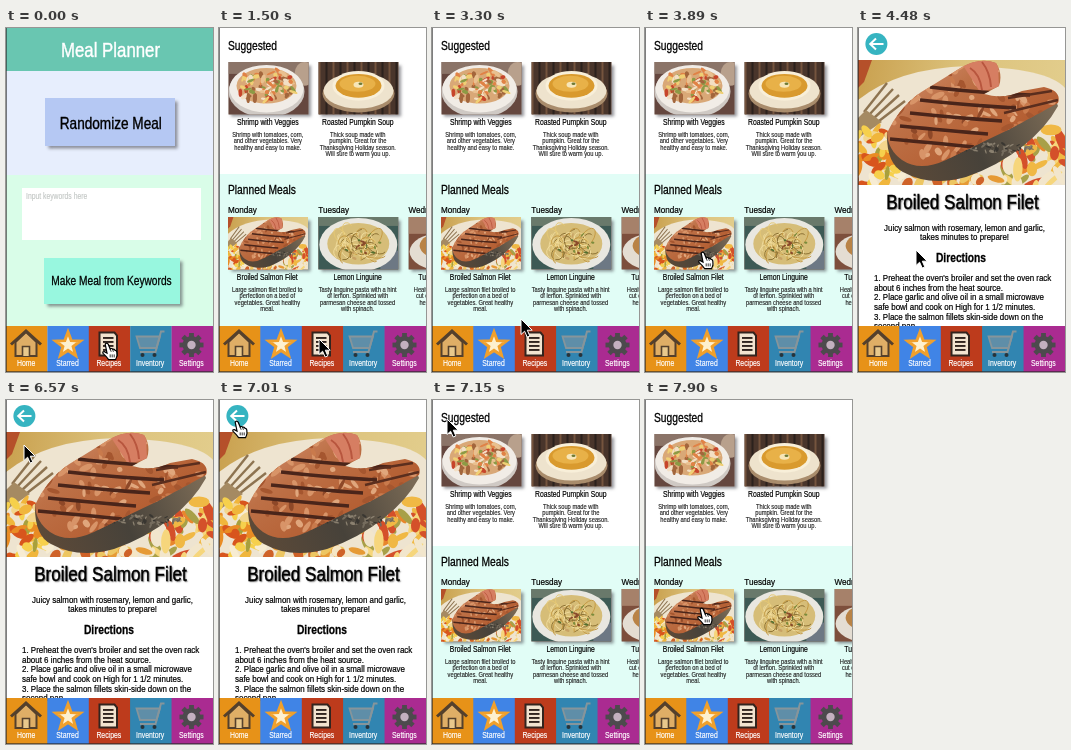
An HTML page with a canvas for the animation above (8000 ms loop, 207 by 344 pixels).

```html
<!DOCTYPE html>
<html lang="en">
<head>
<meta charset="utf-8">
<title>Meal Planner</title>
<style>
  html, body { margin: 0; width: 100%; height: 100%; overflow: hidden; background: #fff; }
  canvas { display: block; width: 207px; height: 344px; }
</style>
</head>
<body>
<canvas id="stage"></canvas>
<script>
const W = 207, H = 344, LOOP = 8000;
const NARROW = 0.82; // condensed face
const canvas = document.getElementById('stage');
const ctx = canvas.getContext('2d');
const dpr = window.devicePixelRatio || 1;
canvas.width = W * dpr;
canvas.height = H * dpr;

// start ms, screen, pointer, x, y
const STEPS = [
  [0, home, hand, 96, 314],
  [1500, list, arrow, 100, 311],
  [3300, list, arrow, 89, 291],
  [3450, list, arrow, 75, 263],
  [3590, list, arrow, 60, 237],
  [3740, list, hand, 54, 224],
  [3890, list, hand, 53, 223],
  [4480, recipe, arrow, 58, 222],
  [5980, recipe, arrow, 48, 167],
  [6130, recipe, arrow, 37, 116],
  [6420, recipe, arrow, 31, 79],
  [6570, recipe, arrow, 18, 45],
  [6720, recipe, arrow, 16, 27],
  [6860, recipe, hand, 13, 21],
  [7010, recipe, hand, 13, 20],
  [7150, list, arrow, 15, 19],
  [7600, list, arrow, 15, 27],
  [7750, list, arrow, 33, 130],
  [7900, list, hand, 52, 207]
];

function rect(x, y, w, h, color) {
  ctx.fillStyle = color;
  ctx.fillRect(x, y, w, h);
}

function ellipse(x, y, rx, ry, color, turn = 0) {
  ctx.beginPath();
  ctx.ellipse(x, y, rx, ry, turn, 0, Math.PI * 2);
  ctx.fillStyle = color;
  ctx.fill();
}

function shape(d, fill, line, width = 1) {
  const path = new Path2D(d);
  if (fill) { ctx.fillStyle = fill; ctx.fill(path); }
  if (line) { ctx.strokeStyle = line; ctx.lineWidth = width; ctx.stroke(path); }
}

function text(str, x, y, size, { align = 'left', color = '#000', weight = 400 } = {}) {
  ctx.save();
  ctx.translate(x, y);
  ctx.scale(NARROW, 1);
  ctx.font = `${weight} ${size}px "Liberation Sans", sans-serif`;
  ctx.textAlign = align;
  ctx.fillStyle = ctx.strokeStyle = color;
  ctx.fillText(str, 0, 0);
  // A hairline gives the strokes a slightly firmer weight
  ctx.shadowColor = 'transparent';
  ctx.lineWidth = size * 0.022;
  ctx.strokeText(str, 0, 0);
  ctx.restore();
}

function lines(rows, x, y, step, size, style) {
  rows.forEach((row, i) => text(row, x, y + i * step, size, style));
}

function shadow(blur, dx, dy, color) {
  ctx.shadowBlur = blur * dpr;
  ctx.shadowOffsetX = dx * dpr;
  ctx.shadowOffsetY = dy * dpr;
  ctx.shadowColor = color;
}

function raised(x, y, w, h, color) {
  ctx.save();
  shadow(3, 2.5, 2.5, 'rgba(60,60,70,.55)');
  rect(x, y, w, h, color);
  ctx.restore();
}

function random(seed) {
  return () => (seed = (seed * 16807) % 2147483647) / 2147483647;
}

// Scatter small food pieces inside an ellipse
function scatter(seed, count, colors, x, y, rx, ry, size) {
  const rnd = random(seed);
  for (let i = 0; i < count; i++) {
    const a = rnd() * Math.PI * 2, r = Math.sqrt(rnd());
    ellipse(x + Math.cos(a) * r * rx, y + Math.sin(a) * r * ry,
      size * (0.6 + rnd()), size * (0.3 + rnd() * 0.4),
      colors[Math.floor(rnd() * colors.length)], rnd() * 3);
  }
}

function photo(x, y, w, h, draw, unitW = w, unitH = h) {
  ctx.save();
  ctx.translate(x, y);
  ctx.beginPath();
  ctx.rect(0, 0, w, h);
  ctx.clip();
  ctx.scale(w / unitW, h / unitH);
  draw();
  ctx.restore();
}

function shrimp() {
  rect(0, 0, 80, 53, '#65473f');
  rect(0, 0, 80, 12, '#8b7468');
  ellipse(76, 12, 10, 12, '#b8a08c');
  ellipse(38, 30, 38, 26, '#cfc9c4');
  ellipse(38, 27, 37, 24, '#f1ece6');
  ellipse(38, 24, 30, 18, '#d9a877');
  scatter(31, 95, ['#e9c08f', '#f3dfc4', '#c7452b', '#e08246', '#8c9a45', '#f0cf74', '#a3663c'],
    38, 24, 29, 17, 3.2);
}

function soup() {
  rect(0, 0, 80, 53, '#49352b');
  for (let i = 0; i < 12; i++) rect(i * 7, 0, 2, 53, i % 2 ? '#2b211d' : '#75543e');
  ellipse(40, 32, 36, 19, '#a98c6c');
  ellipse(40, 29, 35, 18, '#eee3cd');
  ellipse(40, 24, 26, 15, '#f8efd9');
  ellipse(40, 24, 23, 12, '#d99a2e');
  ellipse(39, 22, 18, 8, '#e8b148');
  ellipse(40, 23, 5, 3, '#f7e6b9');
  ellipse(42, 22, 2, 1.3, '#6e7a35');
}

function linguine() {
  rect(0, 0, 80, 53, '#3d5a55');
  rect(0, 0, 80, 9, '#69796b');
  rect(62, 34, 18, 19, '#6d7884');
  ellipse(40, 28, 39, 27, '#e9e7e0');
  ellipse(40, 27, 31, 21, '#d6bd78');
  const rnd = random(52);
  for (let i = 0; i < 42; i++) {
    ctx.beginPath();
    ctx.ellipse(40 + (rnd() - 0.5) * 36, 27 + (rnd() - 0.5) * 23, 5 + rnd() * 7, 3 + rnd() * 4,
      rnd() * 3, 0, 2 + rnd() * 4);
    ctx.strokeStyle = ['#f0dc9d', '#c49a45', '#e5c874', '#8d7134'][i % 4];
    ctx.lineWidth = 1;
    ctx.stroke();
  }
  scatter(8, 20, ['#53702f', '#c7a164', '#7b8c3c', '#8a4b2b'], 40, 26, 25, 16, 1.9);
}

function turkey() {
  rect(0, 0, 80, 53, '#7d4f3c');
  rect(0, 0, 80, 17, '#a6816a');
  ellipse(34, 35, 33, 19, '#e4ddd2');
  ellipse(36, 29, 25, 14, '#b98346');
}

function salmon() {
  const cloth = ctx.createLinearGradient(0, 0, 207, 30);
  cloth.addColorStop(0, '#c9a04e');
  cloth.addColorStop(0.5, '#dcc27c');
  cloth.addColorStop(1, '#e2cd8c');
  rect(0, 0, 207, 125, cloth);
  shape('M0 0H14L6 22 0 28Z', '#b5502a');
  shape('M0 40Q40 8 110 6Q190 8 207 28V125H0Z', '#eee4d0');

  // Fork
  for (let i = 0; i < 4; i++) {
    shape(`M${6 + i * 5} ${52 + i * 3}L${29 + i * 6} ${23 + i * 6}`, null, '#8d7350', 2.4);
  }
  shape('M0 58L8 50 24 62 0 78Z', '#a58a62');

  scatter(17, 60, ['#e98c24', '#f0b63c', '#f6d04c', '#f7ecd2', '#a8a03c', '#d8551d', '#f3d68d'],
    16, 99, 36, 29, 7);
  scatter(71, 60, ['#f2e6cc', '#e8862c', '#d4502a', '#f0b844', '#f6d67c', '#a8a048'],
    176, 96, 42, 36, 8);
  scatter(12, 24, ['#e69a35', '#f5e6c5', '#cf6228', '#edc662'], 100, 120, 60, 9, 7);

  // Skin along the lower edge
  const skin = ctx.createLinearGradient(40, 120, 195, 50);
  skin.addColorStop(0, '#5d4a38');
  skin.addColorStop(0.5, '#47423a');
  skin.addColorStop(1, '#7a6a55');
  shape('M29 72Q28 103 45 112Q72 127 108 117Q140 106 165 86Q188 68 200 46L196 36 100 75Z', skin);
  scatter(63, 45, ['#756c5e', '#393631', '#8b8170'], 142, 89, 36, 6, 2);

  const flesh = 'M29 73Q44 42 70 28L104 7Q122-3 138 3Q145 14 141 26L126 34' +
    'Q146 40 164 31L186 27Q204 31 200 43Q178 55 150 70Q112 88 88 100Q62 112 44 100Q30 90 29 73Z';
  const face = ctx.createLinearGradient(50, 10, 110, 100);
  face.addColorStop(0, '#d08a68');
  face.addColorStop(0.4, '#bd7046');
  face.addColorStop(1, '#b45e32');
  shape(flesh, face);
  ctx.save();
  ctx.clip(new Path2D(flesh));
  scatter(45, 130, ['#d89468', '#a5562f', '#e0a67c', '#8e4828', '#c97a4c'], 110, 54, 90, 50, 4.5);
  shape('M104 4Q124-4 140 3L141 27 122 32Q112 16 104 4Z', '#d67e62');
  shape('M112 8Q122 14 124 30M124 2Q132 12 133 27', null, '#b8563e', 2);
  for (let i = 0; i < 5; i++) {
    shape(`M${72 - i * 10} ${27 + i * 13}Q${112 - i * 6} ${32 + i * 13} ${172 - i * 14} ${35 + i * 13}`,
      null, '#4a251a', 3.6);
  }
  shape('M150 38L194 31M146 53L200 40', null, '#5b2e1e', 2.5);
  ctx.restore();
}

function nav() {
  ['#e79218', '#4084e6', '#bd3b1c', '#3185b1', '#aa2b91']
    .forEach((color, i) => rect(i * 41.4, 298, 41.6, 46, color));

  shape('M9.5 314V328H30.5V314L20 304Z', '#dfae66', '#54402c', 2);
  shape('M5 316.5L20 303 35 316.5', null, '#54402c', 3);
  shape('M16.5 328V318.5H23.5V328', '#e8c88c', '#54402c', 1.6);

  let star = '';
  for (let i = 0; i < 10; i++) {
    const r = i % 2 ? 5.4 : 13, a = (i / 5 - 0.5) * Math.PI;
    star += `${i ? 'L' : 'M'}${62 + r * Math.cos(a)} ${317 + r * Math.sin(a)}`;
  }
  shape(star + 'Z', '#fdf0cf', '#f0a02c', 3);

  shape('M93.5 304.5H108.5L111 307.5V327.5H93.5Z', '#f2e3cf', '#33241e', 2);
  for (let y = 309; y < 325; y += 4) rect(97, y, 10.5, 1.9, '#30241f');

  shape('M130.5 308.5H154L150.5 320H134Z', '#5f8ea8', '#86959b', 1.8);
  shape('M158.5 303.5H155L149.5 324H134', null, '#86959b', 2);
  ellipse(136.5, 327, 2, 2, '#27333a');
  ellipse(148.5, 327, 2, 2, '#27333a');

  ctx.save();
  ctx.translate(185.5, 317);
  for (let i = 0; i < 8; i++) {
    rect(-2.4, -12, 4.8, 6, '#4d4a4d');
    ctx.rotate(Math.PI / 4);
  }
  ellipse(0, 0, 9, 9, '#4d4a4d');
  ellipse(0, 0, 4.2, 4.2, '#c3b0bf');
  ctx.restore();

  ['Home', 'Starred', 'Recipes', 'Inventory', 'Settings'].forEach((label, i) =>
    text(label, 20.2 + i * 41.3, 338, 8.4, { align: 'center', color: '#fff' }));
}

function home() {
  rect(0, 0, W, 43, '#69c6b1');
  text('Meal Planner', 104.5, 29, 20.5, { align: 'center', color: '#fff' });
  rect(0, 43, W, 104, '#e7eefd');
  rect(0, 147, W, 151, '#d9fde8');
  raised(39, 70, 130, 48, '#b5c8f3');
  text('Randomize Meal', 104.8, 101, 16.6, { align: 'center' });
  rect(16, 160, 179, 52, '#fff');
  text('Input keywords here', 20, 170.5, 8.3, { color: '#c4c8c6' });
  raised(38, 230, 136, 46, '#98f7df');
  text('Make Meal from Keywords', 105.5, 257, 12.4, { align: 'center' });
}

function dish(x, y, draw, title, about) {
  raised(x, y, 80, 52.5, '#8b7468');
  photo(x, y, 80, 52.5, draw, draw === salmon ? 207 : 80, draw === salmon ? 125 : 53);
  const mid = { align: 'center' };
  text(title, x + 39.3, y + 62.5, 8.3, mid);
  lines(about, x + 39.3, y + 75, 6.3, 7, { ...mid, color: '#222' });
}

function list() {
  rect(0, 0, W, 146, '#fff');
  rect(0, 146, W, 152, '#e1fdf6');
  text('Suggested', 9, 22, 12.5);
  dish(9.5, 34, shrimp, 'Shrimp with Veggies',
    ['Shrimp with tomatoes, corn,', 'and other vegetables. Very', 'healthy and easy to make.']);
  dish(99.5, 34, soup, 'Roasted Pumpkin Soup',
    ['Thick soup made with', 'pumpkin. Great for the', 'Thanksgiving Holiday season.', 'Will sure to warm you up.']);
  text('Planned Meals', 9, 166, 12.5);
  ['Monday', 'Tuesday', 'Wednesday'].forEach((day, i) => text(day, 9 + i * 90.3, 185, 9.9));
  dish(9, 189, salmon, 'Broiled Salmon Filet',
    ['Large salmon filet broiled to', 'perfection on a bed of', 'vegetables. Great healthy', 'meal.']);
  dish(99.3, 189, linguine, 'Lemon Linguine',
    ['Tasty linguine pasta with a hint', 'of lemon. Sprinkled with', 'parmesan cheese and tossed', 'with spinach.']);
  dish(189.6, 189, turkey, 'Turkey Sandwiches',
    ['Healthy turkey sandwiches', 'cut evenly into slices that', 'help fill you up quickly.']);
}

function recipe() {
  rect(0, 0, W, 298, '#fff');
  ellipse(18.4, 16, 11, 11, '#36b4c1');
  shape('M25.5 16H12.5M18 10.5L12.2 16 18 21.5', null, '#fff', 2);
  photo(0, 32, W, 125, salmon, 207, 125);
  const mid = { align: 'center' };
  ctx.save();
  shadow(1.5, 1, 1, 'rgba(0,0,0,.6)');
  text('Broiled Salmon Filet', 104.5, 180.5, 20.8, mid);
  ctx.restore();
  lines(['Juicy salmon with rosemary, lemon and garlic,', 'takes minutes to prepare!'],
    106.5, 202.5, 9.6, 9.65, mid);
  text('Directions', 103, 234, 12.5, { ...mid, weight: 700 });
  lines([
    "1. Preheat the oven's broiler and set the oven rack",
    'about 6 inches from the heat source.',
    '2. Place garlic and olive oil in a small microwave',
    'safe bowl and cook on High for 1 1/2 minutes.',
    '3. Place the salmon fillets skin-side down on the',
    'second pan.'
  ], 16, 253, 9.65, 9.7);
}

function arrow() {
  shape('M0 0V15.5L3.6 12.2 6.2 18 8.8 16.9 6.3 11.2H11.2Z', '#000', '#fff', 1);
}

function hand() {
  shape('M3.2 2.2Q4.8 0 6.3 2.4L8.2 7Q9.8 5.8 10.8 7.4Q12.3 6.6 13 8.4Q14.4 8.2 14.8 10L15 13.2Q14.8 15.2 13.6 17.6H6.6Q4.6 14.6 1 11.4Q.2 9.4 2.4 9.6L5 11Z',
    '#fff', '#000', 1.2);
  shape('M8.2 7L9.2 9.8M10.8 7.6L11.4 9.8M8.2 12.4V15.4M10.2 12.4V15.4M12.2 12.4V15.4', null, '#000', 0.8);
}

let shown;
function frame(now) {
  const t = now % LOOP;
  const step = STEPS.findLast(s => s[0] <= t);
  if (step !== shown) {
    shown = step;
    const [, screen, pointer, x, y] = step;
    ctx.setTransform(dpr, 0, 0, dpr, 0, 0);
    screen();
    nav();
    rect(0, 0, 1, H, 'rgba(40,40,40,.6)');
    rect(0, H - 1, W, 1, 'rgba(40,40,40,.6)');
    ctx.translate(x, y);
    pointer();
  }
  requestAnimationFrame(frame);
}
requestAnimationFrame(frame);
</script>
</body>
</html>
```
